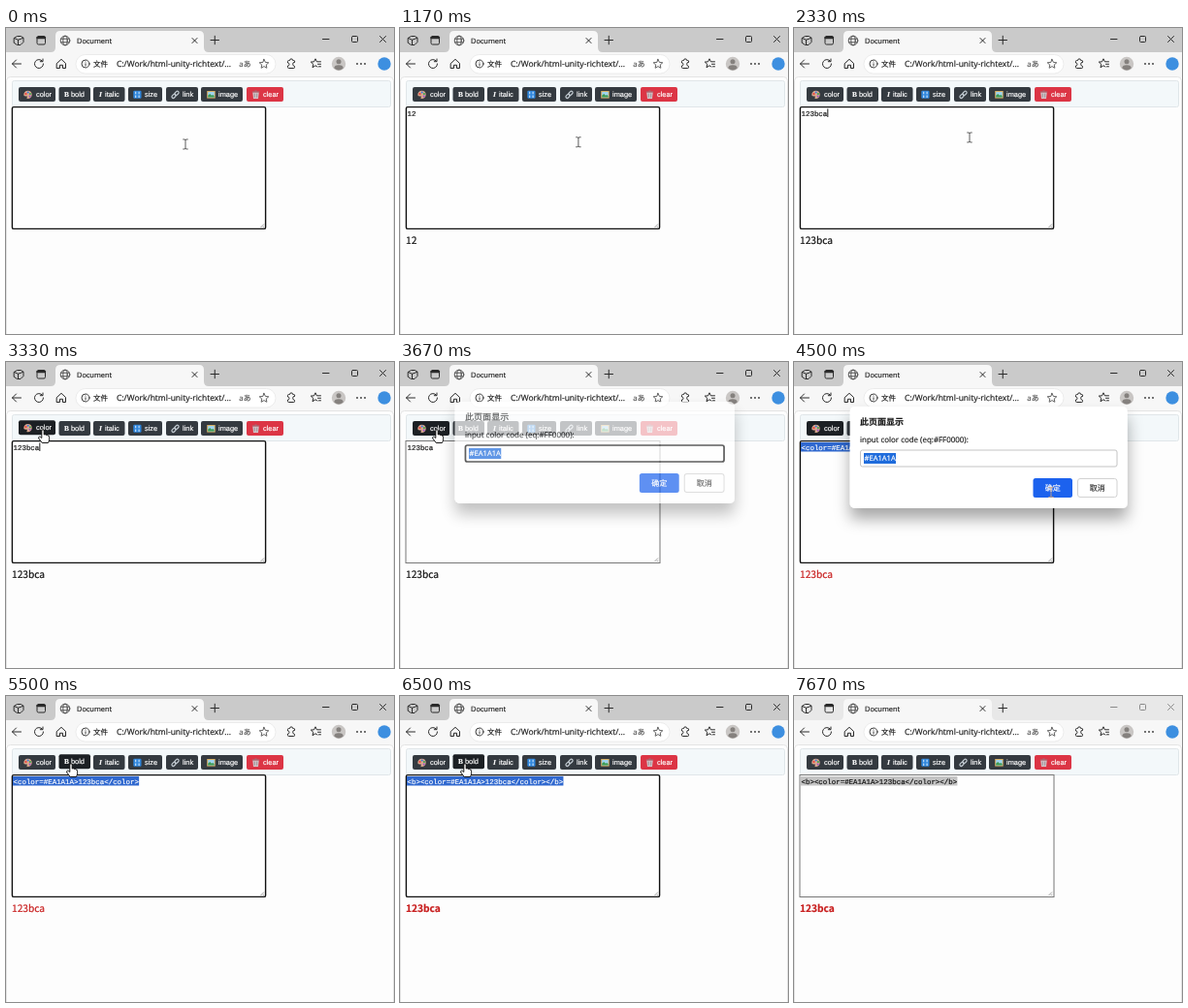
An HTML page that plays this animation: 400x316 px, repeating every 7.84 s.

```html
<!DOCTYPE html>
<html lang="zh">
<head>
<meta charset="utf-8">
<title>Rich text editor demo</title>
<style>
  html, body { margin: 0; width: 100%; height: 100%; overflow: hidden; background: #fdfdfd; }
  svg { display: block; width: 100vw; height: 100vh; text-rendering: geometricPrecision; }
  text { white-space: pre; stroke-width: .18; }
  .ui { font-family: "Open Sans", "Noto Sans CJK SC", "Noto Sans CJK", sans-serif; fill: #1c1c1c; stroke: #1c1c1c; }
  .cjk { font-family: "Noto Sans CJK SC", "Noto Sans CJK", sans-serif; }
  .btn { font: 7.4px "Liberation Sans", sans-serif; }
  .serif { font: bold 7.4px "Liberation Serif", serif; }
  .code { font: 7.45px "Liberation Mono", monospace; }
  .btn, .serif, .light { fill: #fff; stroke: #fff; }
  .line { fill: none; stroke: #2a2a2a; stroke-width: 1; stroke-linecap: round; stroke-linejoin: round; }
</style>
</head>
<body>
<svg viewBox="0 0 400 316">
  <defs>
    <filter id="shadow" x="-20%" y="-30%" width="140%" height="190%">
      <feDropShadow dx="0" dy="11" stdDeviation="8" flood-color="#000" flood-opacity=".34"/>
    </filter>
  </defs>
  <rect width="400" height="316" fill="#fdfdfd"/>
  <rect id="titleBar" width="400" height="26" fill="#cacaca"/>
  <path d="M46 25q5 0 5-5V8q0-5 5-5H199q5 0 5 5V20q0 5 5 5Z" fill="#f7f7f7"/>
  <rect y="25" width="400" height="26" fill="#f7f7f7"/>
  <rect x=".5" y="50.5" width="399" height="275" rx="4" fill="#fdfdfd" stroke="#e4e4e4"/>

  <!-- title bar -->
  <g class="line">
    <path d="M8.500 10.300L11.500 8.500H15.500L18 10.300V14.500L15 17.500H11.500L8.500 15.500ZM8.500 10.500L12.500 12.300 17.800 10.300M12.500 12.300V17.300"/>
    <rect x="32" y="8.500" width="8.500" height="8.500" rx="1.500"/>
    <path d="M32.500 10H40" stroke-width="2.400"/>
    <g stroke="#444" stroke-width=".9">
      <circle cx="61" cy="13" r="4.800"/>
      <ellipse cx="61" cy="13" rx="2.200" ry="4.800"/>
      <path d="M56.800 11.200H65.200M56.800 14.800H65.200"/>
    </g>
    <path d="M192 10.500l5 5m0-5l-5 5M211 12.500H219.500M215.250 8.250V16.750"/>
    <g id="controls">
      <path d="M326.500 11.500H333M385.500 8.500l6 6m0-6l-6 6"/>
      <rect x="356.500" y="8.500" width="6" height="6" rx="1"/>
    </g>
  </g>
  <text class="ui" x="73" y="15.600" font-size="7.400">Document</text>

  <!-- address row -->
  <rect x="72" y="27.500" width="206" height="19.500" rx="9.700" fill="#fff" stroke="#e6e6e6" stroke-width=".7"/>
  <g class="line">
    <path d="M15.500 37H6.500M10.500 33L6.500 37 10.500 41"/>
    <path d="M37.500 34.200A4.500 4.500 0 1 0 38.500 37M38 32V34.700H35.300"/>
    <path d="M52.500 36.500L57 32.300 61.500 36.500V41.500H58.500V38.300H55.500V41.500H52.500Z"/>
    <circle cx="82" cy="37" r="4" stroke-width=".9"/>
    <path d="M82 36.800V39M82 35V35.100" stroke-width=".9"/>
    <path id="star" stroke="#555" stroke-width=".9"/>
    <path d="M297.500 35V34.300Q297.500 33.500 296.700 33.500H295.700A1.600 1.600 0 0 0 292.500 33.500H291.500Q290.500 33.500 290.500 34.500V36A1.500 1.500 0 0 1 290.500 39V40.500Q290.500 41.500 291.500 41.500H296.700Q297.500 41.500 297.500 40.700V39.500A2.300 2.300 0 0 1 297.500 35Z"/>
    <path d="M321 40L319 38.800 316 40.800 316.800 37.400 314.300 35.100 317.600 34.800 319 31.800 320.400 34.800H324.500M321.500 37.300H324.500M322.500 39.800H324.500"/>
  </g>
  <text class="ui" x="90" y="39.800" font-size="7.500">文件</text>
  <text class="ui" x="114" y="40" font-size="8.500">C:/Work/html-unity-richtext/...</text>
  <text class="ui" x="240.300" y="39.700" font-size="7.800" style="fill:#555;stroke:#555">aあ</text>
  <circle cx="343" cy="37" r="7.200" fill="#c9c6c4"/>
  <circle cx="343" cy="34.800" r="2.500" fill="#85817e"/>
  <path d="M338.300 41.600q0-3.400 4.700-3.400t4.700 3.400q-4.700 4-9.400 0Z" fill="#85817e"/>
  <g fill="#333"><circle cx="362" cy="37" r=".9"/><circle cx="366" cy="37" r=".9"/><circle cx="370" cy="37" r=".9"/></g>
  <circle cx="390" cy="37" r="6.700" fill="#3d8fe0"/>

  <!-- page -->
  <rect x="6.500" y="54.500" width="390" height="27" rx="2" fill="#f3f8fa" stroke="#e0e6e9"/>
  <g id="buttons"></g>
  <rect id="area" fill="#fefefe"/>
  <path d="M262.500 206L266 202.500M264.800 206L266 204.800" stroke="#777" stroke-width=".7"/>
  <rect id="mark" x="7" y="83" height="9.500"/>
  <text id="code" class="code" x="7.500" y="90.600"></text>
  <path id="caret" stroke="#000" stroke-width=".9"/>
  <text id="preview" class="cjk" x="6" y="223" font-size="10.200"></text>

  <!-- prompt -->
  <g id="dialog">
    <rect x="57.700" y="46" width="286" height="105" rx="5" fill="#fff" filter="url(#shadow)"/>
    <text id="heading" class="cjk" x="68" y="65.300" font-size="9" fill="#1c1c1c" stroke="#1c1c1c">此页面显示</text>
    <text class="ui" x="68" y="82.800" font-size="7.950">input color code (eq:#FF0000):</text>
    <rect id="field" x="68.500" y="91" width="264.500" height="17" rx="2" fill="#fff"/>
    <rect x="72" y="94" width="33" height="11" fill="#1f6cdc"/>
    <text class="ui light" x="72.500" y="102.400" font-size="7.600">#EA1A1A</text>
    <rect x="246.500" y="120" width="40.500" height="20" rx="2.500" fill="#1c62ee"/>
    <rect x="292.500" y="120.500" width="40.500" height="19" rx="2.500" fill="#fff" stroke="#d2d2d2"/>
    <g class="cjk" font-size="8" text-anchor="middle">
      <text class="light" x="266.800" y="133">确定</text>
      <text x="312.800" y="133" fill="#333" stroke="#333">取消</text>
    </g>
  </g>

  <!-- pointers -->
  <path id="beam" d="M-2.700-5H-1Q0-5 0-4Q0-5 1-5H2.700M0-4V4M-2.700 5H-1Q0 5 0 4Q0 5 1 5H2.700" fill="none" stroke-width=".8"/>
  <path id="arrow" d="M0 0V11L2.600 8.700 4.300 12.500 5.900 11.800 4.300 8.100H7.500Z" fill="#fff" stroke="#000" stroke-width=".8"/>
  <path id="hand" d="M-1.200 7V.8Q-1.200-.2 0-.2T1.200.8V5Q2.600 4.300 3.200 5.400 4.600 4.900 5 6 6.600 5.800 6.600 7.400V9.500Q6.600 11.500 5.400 13.500H-.8L-4.200 9Q-5 7.500-3.600 7.200-2.400 7-1.200 8.500Z" fill="#fff" stroke="#000" stroke-width=".9" stroke-linejoin="round"/>
</svg>
<script>
const $ = id => document.getElementById(id);
const set = (el, attrs) => { for (const k in attrs) el.setAttribute(k, attrs[k]); };
const show = (el, on) => el.setAttribute('visibility', on ? 'visible' : 'hidden');
const ink = (el, color) => set(el, { fill: color, stroke: color });

const LOOP = 7840, LAST = 46, CELL = 4.47;
const COLORED = '<color=#EA1A1A>123bca</color>';

const starPoints = Array.from({ length: 10 }, (_, i) => {
  const r = i % 2 ? 2.3 : 5, a = i * Math.PI / 5;
  return [266 + r * Math.sin(a), 37.3 - r * Math.cos(a)].map(v => v.toFixed(1)).join(' ');
});
$('star').setAttribute('d', 'M' + starPoints.join('L') + 'Z');

// Icons sit in a 9 x 9 box
const icons = {
  color: '<path d="M4.500.5C7 .5 8.700 2 8.700 4.500S7 8.700 4.500 8.700 5 6.300 3.500 6.200.3 6.500.3 4.500 2 .5 4.500.5Z" fill="#d9a78c"/><circle cx="2.500" cy="3.600" r="1" fill="#e33"/><circle cx="4.700" cy="2.200" r="1" fill="#3a7be0"/><circle cx="6.900" cy="3.800" r="1" fill="#2fa84f"/><circle cx="6.600" cy="6.300" r="1" fill="#9b4fd0"/>',
  size: '<rect x=".3" y=".5" width="8.200" height="8" rx="1" fill="#2f86dc"/><path d="M2.700 1.500V4M6.100 1.500V4M2.700 5.200V7.700M6.100 5.200V7.700" stroke="#cfe4f8" stroke-width="1.100"/>',
  link: '<g fill="none" stroke="#c3ccd3" stroke-width="1.200"><rect x="-2.200" y="-1.400" width="4.800" height="2.900" rx="1.450" transform="translate(2.900 6.100) rotate(-45)"/><rect x="-2.200" y="-1.400" width="4.800" height="2.900" rx="1.450" transform="translate(5.800 3.200) rotate(-45)"/></g>',
  image: '<rect x=".2" y=".7" width="8.500" height="7.600" fill="#d8b165"/><rect x="1.200" y="1.700" width="6.500" height="5.600" fill="#9fd3ee"/><path d="M1.200 7.300V5.500L3.200 3.700 5 5.500 6.200 4.700 7.700 6V7.300Z" fill="#3c9b52"/>',
  clear: '<path d="M1.300 2.200H7.700L7 8.700H2Z" fill="#d4c5c9"/><path d="M.8 1.700H8.200M3.400.7H5.600M3.300 3.300V7.500M5.700 3.300V7.500" stroke="#8f8287" stroke-width=".8"/>'
};

// name, left, width, icon x, label x
const buttons = [
  ['color', 13, 38, 18, 31], ['bold', 54.5, 32.5, 60, 67], ['italic', 90, 32.5, 96, 102],
  ['size', 126, 35, 131, 143], ['link', 165, 33, 170, 182], ['image', 201, 43, 207, 219],
  ['clear', 248, 38, 253, 265]
].map(([name, x, w, ix, tx]) => {
  const g = document.createElementNS('http://www.w3.org/2000/svg', 'g');
  const letter = { bold: 'B', italic: 'I' }[name];
  const icon = letter
    ? `<text class="serif" x="${ix}" y="71"${letter === 'I' ? ' style="font-style:italic"' : ''}>${letter}</text>`
    : `<g transform="translate(${ix} 64.3)">${icons[name]}</g>`;
  g.innerHTML = `<rect x="${x}" y="61" width="${w}" height="15" rx="2"/>${icon}<text class="btn" x="${tx}" y="71.2">${name}</text>`;
  $('buttons').append(g);
  return { name, x, w, g, box: g.firstChild };
});

// step, x, y
const path = [
  [0, 185, 120], [6, 184, 118], [14, 181, 113], [15, 181, 113], [20, 38, 70], [22, 38, 70],
  [26, 265, 134.5], [28, 265, 134.5], [32, 67, 70], [39, 67, 70], [43, 268, 91], [46, 268, 91]
];

function pointerAt(k) {
  const i = Math.max(1, path.findIndex(p => p[0] >= k));
  const [a, ax, ay] = path[i - 1], [b, bx, by] = path[i];
  const u = (k - a) / (b - a), e = u * u * (3 - 2 * u);
  return [ax + (bx - ax) * e, ay + (by - ay) * e];
}

// Steps at which each character is typed
const keys = [4, 6, 8, 10, 11, 13];

function draw(ms) {
  const k = Math.min(LAST, Math.floor((ms % LOOP + 5) * 6 / 1000));
  const typed = '123bca'.slice(0, keys.filter(s => s <= k).length);
  const colored = k >= 27, bold = k >= 37, away = k === LAST;
  const prompt = k >= 22 && k <= 27, opening = k === 22;
  const pressed = k === 21 || k === 36;
  const focused = !away && !pressed && !(k >= 22 && k < 27);

  $('titleBar').setAttribute('fill', away ? '#e8e8e8' : '#cacaca');
  $('controls').setAttribute('stroke', away ? '#8a8a8a' : '#2a2a2a');

  set($('area'), focused
    ? { x: 6.4, y: 81.6, width: 261.2, height: 125.8, rx: 1.5, stroke: '#101010', 'stroke-width': 1.4 }
    : { x: 6, y: 81.5, width: 262, height: 126, rx: 0, stroke: '#777', 'stroke-width': 1 });

  const code = bold ? `<b>${COLORED}</b>` : colored ? COLORED : typed;
  $('code').textContent = code;
  ink($('code'), colored && focused ? '#fff' : '#111');
  set($('mark'), { width: colored ? code.length * CELL + .5 : 0, fill: focused ? '#2f68cf' : '#c4c4c4' });
  const cx = 8 + code.length * CELL;
  $('caret').setAttribute('d', `M${cx} 83.5V92`);
  show($('caret'), focused && !colored && ((k + 1) % 6 >= 3 || keys.includes(k)));

  $('preview').textContent = typed;
  $('preview').setAttribute('font-weight', bold ? 700 : 400);
  ink($('preview'), colored ? '#c81e1e' : '#111');

  show($('dialog'), prompt);
  set($('dialog'), {
    opacity: opening ? .7 : 1,
    transform: opening ? 'translate(-1.6 -5) scale(1.008 1)' : ''
  });
  $('heading').setAttribute('font-weight', opening ? 500 : 700);
  const active = k < 27;
  set($('field'), { stroke: active ? '#1b1b1b' : '#c4c4c4', 'stroke-width': active ? 1.7 : 1 });

  const [px, py] = pointerAt(k);
  let over = null;
  for (const b of buttons) {
    const hit = prompt ? b.name === 'color' : !away && px >= b.x && px <= b.x + b.w && py >= 61 && py <= 76;
    if (hit) over = b;
    const base = b.name === 'clear' ? '#dc3545' : '#343a40';
    b.box.setAttribute('fill', hit ? (b.name === 'clear' ? '#bb2d3b' : '#1c2024') : base);
    b.g.setAttribute('transform', `translate(0 ${hit && !prompt && !pressed ? -.8 : 0})`);
  }

  const inArea = px < 268 && py > 82;
  const closing = k === 27;
  const kind = away ? '' : closing ? 'beam' : prompt ? (opening ? 'hand' : 'arrow')
    : over ? 'hand' : inArea ? 'beam' : 'arrow';
  for (const id of ['beam', 'arrow', 'hand']) {
    show($(id), id === kind);
    $(id).setAttribute('transform', `translate(${px.toFixed(1)} ${py.toFixed(1)})`);
  }
  $('beam').setAttribute('stroke', closing ? '#d9a877' : '#333');
}

const start = performance.now();
function tick() {
  draw(performance.now() - start);
  requestAnimationFrame(tick);
}
draw(0);
requestAnimationFrame(tick);
</script>
</body>
</html>
```
